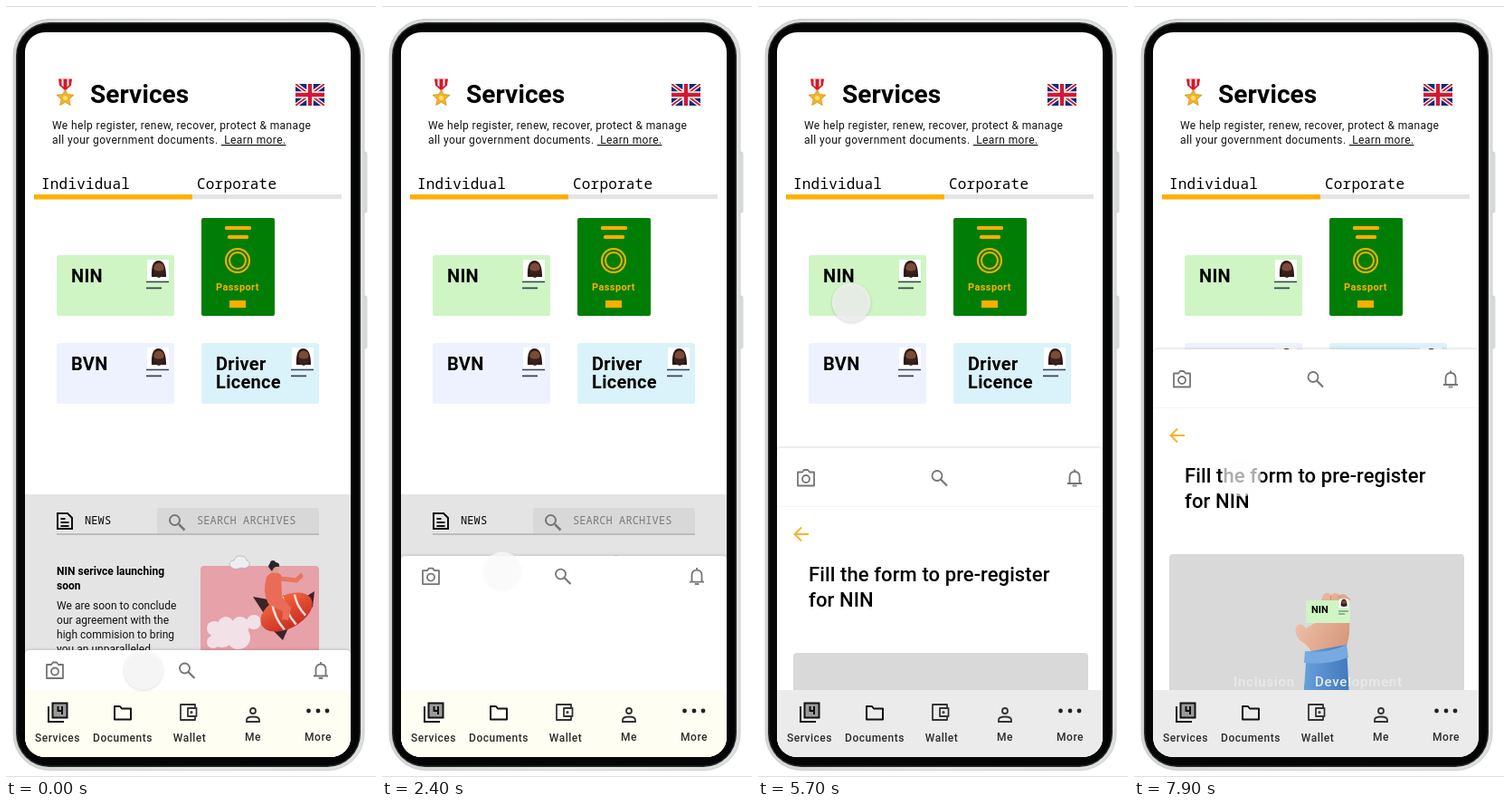
Recreate the animation shown at these times as an HTML page. Size 409 by 851 pixels, loop 8 s.

```html
<!DOCTYPE html>
<html lang="en">
<head>
<meta charset="utf-8">
<title>Services app</title>
<style>
html, body { margin: 0; width: 100%; height: 100%; overflow: hidden; background: #fff; }
svg { display: block; }
text { font-family: Roboto, sans-serif; font-size: 12px; white-space: pre; letter-spacing: .04px; }
.mono { font-family: "Roboto Mono", "Noto Sans Mono", monospace; letter-spacing: .1px; }
.tab { font-size: 16px; letter-spacing: .2px; }
.b { font-weight: 700; }
.card { font-weight: 700; font-size: 20px; letter-spacing: .3px; }
.spaced { letter-spacing: .4px; }
.title { font-weight: 500; font-size: 22px; letter-spacing: .1px; }
.faint { font-weight: 500; font-size: 15px; letter-spacing: .75px; fill: #e9e9e9; }
.label { font-weight: 500; letter-spacing: .5px; text-anchor: middle; fill: #2b2b2b; }
.line { fill: none; stroke: #111; stroke-width: 2; }
.tool { fill: none; stroke: #757575; stroke-width: 1.8; }
#sheet { filter: drop-shadow(0 -1px 1.5px #0002); }
</style>
</head>
<body>
<svg width="409" height="851" viewBox="0 0 409 851">
  <defs>
    <clipPath id="screen"><rect x="21" y="29" width="360" height="800" rx="22"/></clipPath>
    <clipPath id="flag"><path d="M320 86h32v24h-32z"/></clipPath>
    <clipPath id="pic"><rect x="215" y="618" width="131" height="140" rx="4"/></clipPath>
    <linearGradient id="metal" x2="1">
      <stop offset="0" stop-color="#d2d5d4"/><stop offset=".5" stop-color="#e6e8e7"/><stop offset="1" stop-color="#dcdfde"/>
    </linearGradient>
    <linearGradient id="sleeve" x2="1">
      <stop offset="0" stop-color="#6aa2dc"/><stop offset="1" stop-color="#3f78bd"/>
    </linearGradient>
    <linearGradient id="skin" x2="1" y2=".6">
      <stop offset="0" stop-color="#f2c9b2"/><stop offset="1" stop-color="#d99a80"/>
    </linearGradient>
    <linearGradient id="hull" x2="0" y2="1">
      <stop offset="0" stop-color="#f0653f"/><stop offset="1" stop-color="#c92f22"/>
    </linearGradient>
    <g id="face">
      <path d="M156 280h24v23h-24z" fill="#fff"/>
      <path d="M161 299q-1-18 7.500-18t8.500 18z" fill="#2b1a17"/>
      <ellipse cx="169" cy="289" rx="5.500" ry="5.500" fill="#7b4a38"/>
      <path d="M163.500 291q5.500 3 11 0q1 8-5.500 9q-6.500-1-5.500-9z" fill="#38211b"/>
    </g>
    <g id="photo">
      <use href="#face"/>
      <path d="M155 304.500h25M155 311.300h17" stroke="#3c4450" stroke-width="1.700"/>
    </g>
  </defs>

  <path d="M0 .5h409M0 850.500h409" stroke="#dedede"/>
  <g fill="#dcdedd" stroke="#c2c5c4" stroke-width=".6">
    <rect x="393" y="161" width="6" height="67" rx="2"/>
    <rect x="393" y="320" width="6" height="58" rx="2"/>
  </g>
  <rect x="8" y="14.500" width="388" height="829" rx="40" fill="url(#metal)" stroke="#c5c9c8" stroke-width=".8"/>
  <rect x="11" y="18" width="381" height="822" rx="37" fill="#2a2d2c"/>
  <rect x="12.500" y="19.500" width="378" height="819" rx="35" fill="#050505"/>

  <g clip-path="url(#screen)">
    <path d="M21 29h360v800h-360z" fill="#fff"/>

    <!-- header -->
    <path d="M58 80.500h15l-1 7-6.500 6-6.500-6z" fill="#d3182c"/>
    <path d="M61.500 80.500h2v9l-2-2zM67.500 80.500h2v7l-2 2z" fill="#f7efe9"/>
    <path d="M65.500 92l2.500 5.500 7 .8-5.200 4.700 1.500 6.500-5.800-3.200-5.800 3.200 1.500-6.500-5.200-4.700 7-.8z" fill="#f0b429" stroke="#c98a17" stroke-width=".7"/>
    <circle cx="65.500" cy="101.500" r="2.500" fill="#ffdc70"/>
    <text x="93" y="107" class="b" style="font-size:28px;letter-spacing:.1px">Services</text>
    <g clip-path="url(#flag)" fill="none">
      <path d="M320 86h32v24h-32z" fill="#0b2a7a"/>
      <path d="M320 86l32 24M352 86l-32 24" stroke="#fff" stroke-width="4.500"/>
      <path d="M320 86l32 24M352 86l-32 24" stroke="#cf1b32" stroke-width="1.800"/>
      <path d="M336 86v24M320 98h32" stroke="#fff" stroke-width="7.500"/>
      <path d="M336 86v24M320 98h32" stroke="#cf1b32" stroke-width="4.400"/>
    </g>
    <text class="spaced" x="51" y="136" fill="#111">We help register, renew, recover, protect &amp; manage</text>
    <text class="spaced" x="51" y="152" fill="#111">all your government documents. <tspan text-decoration="underline"> Learn more.</tspan></text>
    <text class="mono tab" x="39" y="202">Individual</text>
    <text class="mono tab" x="211" y="202">Corporate</text>
    <path d="M206 208h165v5h-165z" fill="#e4e4e4"/>
    <path d="M31 208h175v5.500h-175z" fill="#ffb000"/>

    <!-- document cards -->
    <rect x="56" y="275" width="130" height="67" rx="2" fill="#cff5c5"/>
    <rect x="56" y="372" width="130" height="67" rx="2" fill="#eef2fe"/>
    <rect x="216" y="372" width="130" height="67" rx="2" fill="#daf2f9"/>
    <text class="card" x="72" y="305">NIN</text>
    <text class="card" x="72" y="402">BVN</text>
    <text class="card" x="232" y="402">Driver</text>
    <text class="card" x="232" y="422">Licence</text>
    <use href="#photo"/>
    <use href="#photo" y="97"/>
    <use href="#photo" x="160" y="97"/>
    <rect x="216" y="234" width="81" height="108" rx="2" fill="#007d05"/>
    <g fill="#ffae00">
      <rect x="242" y="243" width="29" height="4" rx="1.500"/>
      <rect x="245" y="253" width="23" height="4" rx="1.500"/>
      <path d="M247 325h18v8h-18z"/>
      <text class="b" x="256" y="314" text-anchor="middle" style="font-size:11px;letter-spacing:.4px">Passport</text>
    </g>
    <g fill="none" stroke="#ffae00" stroke-width="2">
      <circle cx="256" cy="281" r="13"/><circle cx="256" cy="281" r="9"/>
    </g>

    <!-- news -->
    <path d="M21 539h360v220h-360z" fill="#e4e4e4"/>
    <path class="line" d="M57 560h11l5 5v12h-16zM60.500 566h5M60.500 570h9M60.500 574h9"/>
    <text class="mono" x="87" y="572">NEWS</text>
    <path d="M167 583v-26q0-3 3-3h173q3 0 3 3v26z" fill="#d8d8d8"/>
    <path d="M56 583h290" stroke="#bcbcbc" stroke-width="2"/>
    <path d="M191 572l6.500 6.500" stroke="#777" stroke-width="2.500"/>
    <circle cx="186.500" cy="567.500" r="5.500" fill="none" stroke="#777" stroke-width="2"/>
    <text class="mono" x="211" y="572" fill="#7b7b7b">SEARCH ARCHIVES</text>
    <text class="b" x="56" y="628">NIN serivce launching</text>
    <text class="b" x="56" y="644">soon</text>
    <g fill="#111">
      <text x="56" y="666">We are soon to conclude</text>
      <text x="56" y="682">our agreement with the</text>
      <text x="56" y="698">high commision to bring</text>
      <text x="56" y="714">you an unparalleled</text>
    </g>
    <rect x="215" y="618" width="131" height="140" rx="4" fill="#e6a1a9"/>
    <g clip-path="url(#pic)" fill="#f3e1e8">
      <circle cx="230" cy="687" r="8"/><circle cx="243" cy="683" r="9"/><circle cx="259" cy="684" r="10"/>
      <circle cx="274" cy="680" r="8"/><circle cx="239" cy="696" r="12"/><circle cx="257" cy="697" r="13"/>
      <circle cx="229" cy="702" r="7"/>
    </g>
    <path d="M247 617q0-5 5-5q2-6 8-5q6 1 6 5q4 1 3 5q-3 5-9 3q-9 4-13-3z" fill="#edeef3" stroke="#a9a9b4" stroke-width=".7"/>
    <path d="M273 652l22 4-9 16zM292 686l22-4-8 18zM328 654l13-8-2 18z" fill="#3a2428"/>
    <g transform="rotate(-28 310 669)">
      <ellipse cx="310" cy="669" rx="31" ry="18" fill="url(#hull)"/>
      <path d="M301 652q-6 16-2 33M314 652q-5 16-1 34M327 656q-4 13 0 26" fill="none" stroke="#f7ded6" stroke-width="2.500"/>
    </g>
    <path d="M303 632l18 2 5-5" fill="none" stroke="#e8765f" stroke-width="5" stroke-linecap="round"/>
    <path d="M288 630q8-9 16-2l1 24 10 12-3 14-7-1 1-9-16-8q-7-13-2-30z" fill="#e96b58"/>
    <circle cx="297" cy="621" r="5" fill="#dba18c"/>
    <path d="M290 619q1-6 7-5q6 0 5 5q-6-1-8 5z" fill="#2b2330"/>
    <circle cx="295" cy="615" r="3" fill="#2b2330"/>

    <!-- pull-up sheet, drawn from its own top edge -->
    <g id="sheet">
      <path d="M21 420V5q0-5 5-5h350q5 0 5 5v415z" fill="#fff"/>
      <g id="form">
        <path d="M21 64.500h360" stroke="#f5f5f5"/>
        <path d="M56 95h-15M48 87.500l-7.500 7.500 7.500 7.500" fill="none" stroke="#f3b52c" stroke-width="2"/>
        <text class="title" x="56" y="147">Fill the form to pre-register</text>
        <text class="title" x="56" y="175">for NIN</text>
        <rect x="39" y="226" width="326" height="200" rx="4" fill="#d9d9d9"/>
        <path d="M197 335q-5-9-14-14q-7-9-3-16q5-4 10 3l10-6q4-18 9-31q4-5 9 0q5-4 9 0q6-3 9 2q4 1 3 8l-1 33q-2 13-6 23z" fill="url(#skin)"/>
        <path d="M218 272l-2 12M227 272l-1 12" stroke="#c98d74"/>
        <path d="M191 334l44-8 5 100h-56z" fill="url(#sleeve)"/>
        <path d="M189 333q24 3 46-7l2 14q-24 9-49 6z" fill="#76aae0"/>
        <rect x="190" y="277" width="49" height="25" rx="1" fill="#cff5c5"/>
        <text class="b" x="196" y="291" style="font-size:11px">NIN</text>
        <use href="#face" transform="translate(159.500 155) scale(.43)"/>
        <path d="M226 289h11M226 292h7" stroke="#3c4450" stroke-width=".8"/>
        <text class="faint" x="110" y="372">Inclusion</text>
        <text class="faint" x="200" y="372">Development</text>
      </g>
      <g id="camera" class="tool">
        <path d="M-9-6.500h5l2-2.500h4l2 2.500h5v15h-18z" stroke-linejoin="round"/><circle cy="1" r="4"/>
      </g>
      <g id="search" class="tool"><circle cx="-2.500" cy="-2.500" r="5.500"/><path d="M1.500 1.500l7 7" stroke-width="2.200"/></g>
      <g id="bell" class="tool">
        <path d="M-8 6h16M-5.500 6v-7q0-6 5.500-6t5.500 6v7M0-7v-2.500"/><path d="M-2 8h4v1h-4z" stroke-width="1"/>
      </g>
    </g>

    <!-- bottom navigation -->
    <path id="nav" d="M21 755h360v74h-360z"/>
    <rect x="51.500" y="769.500" width="16" height="16" fill="#9a9a9a" stroke="#111" stroke-width="2"/>
    <path class="line" d="M47 773v17h17M57.500 773v5h4.500M62 773v9"/>
    <path class="line" d="M120 773h6l2 2.500h10v12h-18z" stroke-linejoin="round"/>
    <g class="line" style="stroke:#333;stroke-width:1.800">
      <path d="M209 775v-4h-16v17h16v-4M201 775h9.500v9h-9.500z" stroke-linejoin="round"/><circle cx="205" cy="779.500" r=".7"/>
      <circle cx="273" cy="778" r="3"/><path d="M266 790v-2q0-3.500 7-3.500t7 3.500v2z"/>
    </g>
    <g fill="#222"><circle cx="334.500" cy="778" r="2.400"/><circle cx="345" cy="778" r="2.400"/><circle cx="355" cy="778" r="2.400"/></g>
    <text class="label" x="57" y="812">Services</text>
    <text class="label" x="129" y="812">Documents</text>
    <text class="label" x="203" y="812">Wallet</text>
    <text class="label" x="273" y="811">Me</text>
    <text class="label" x="345" y="811">More</text>

    <circle id="touch" r="21.500"/>
  </g>
</svg>
<script>
const LOOP = 8000;
const el = id => document.getElementById(id);
const mix = (a, b, k) => a + (b - a) * k;

// cubic-bezier(0, 0, .58, 1)
function easeOut(x) {
  let lo = 0, hi = 1;
  for (let i = 0; i < 18; i++) {
    const s = (lo + hi) / 2;
    if (3 * (1 - s) * s * s * .58 + s ** 3 < x) lo = s; else hi = s;
  }
  return lo * lo * (3 - 2 * lo);
}
const linear = x => x;

// Keys are [time, values, easing into this key].
function track(keys, t) {
  let prev = keys[0];
  for (const key of keys) {
    if (t < key[0]) {
      const k = (key[2] || linear)((t - prev[0]) / (key[0] - prev[0]));
      return prev[1].map((v, i) => mix(v, key[1][i], k));
    }
    prev = key;
  }
  return prev[1];
}

const sheetTop = [
  [0, [711]], [600, [711]], [1500, [547]], [1700, [514]], [1900, [491]],
  [2000, [491]], [3100, [711], easeOut], [4300, [711]], [5300, [488], easeOut],
  [6200, [488]], [7500, [379], easeOut]
];
const touchAt = [
  [0, [152, 733]], [300, [142, 732]], [600, [142, 732]], [1700, [124, 522]], [1900, [122, 500]],
  [2000, [122, 500]], [3100, [143, 735], easeOut], [3400, [143, 735]], [4300, [100, 337], easeOut],
  [4700, [103, 326]], [5700, [103, 326]], [6100, [145, 631], easeOut],
  [6200, [145, 631]], [7500, [119, 520], easeOut]
];
// grey level, opacity, shadow
const touchLook = [
  [0, [250, .8, .16]], [500, [250, .8, .16]], [700, [253, .8, 0]], [3400, [250, .8, .04]],
  [3800, [244, .8, .22]], [5700, [244, .8, .22]], [6100, [254, .68, 0]]
];

function draw(t) {
  const [top] = track(sheetTop, t);
  const [x, y] = track(touchAt, t);
  const [grey, alpha, shadow] = track(touchLook, t);
  const [open] = track([[4300, [0]], [4800, [1]]], Math.max(t, 4300));
  const place = (id, px, py) => el(id).setAttribute("transform", `translate(${px} ${py})`);
  const iconY = mix(22.5, 33, open);

  place("sheet", 0, top);
  place("camera", mix(54, 53, open), iconY);
  place("search", mix(200, 200.5, open), iconY);
  place("bell", mix(348, 350, open), iconY);
  el("form").style.opacity = open;
  el("nav").style.fill = `rgb(${mix(254, 235, open)},${mix(255, 235, open)},${mix(242, 235, open)})`;
  place("touch", x, y);
  el("touch").style.fill = `rgba(${grey},${grey},${grey},${alpha})`;
  el("touch").style.filter = `drop-shadow(0 1.5px 1.5px rgba(0,0,0,${shadow}))`;
}

function frame() {
  draw(performance.now() % LOOP);
  requestAnimationFrame(frame);
}
frame();
</script>
</body>
</html>
```
